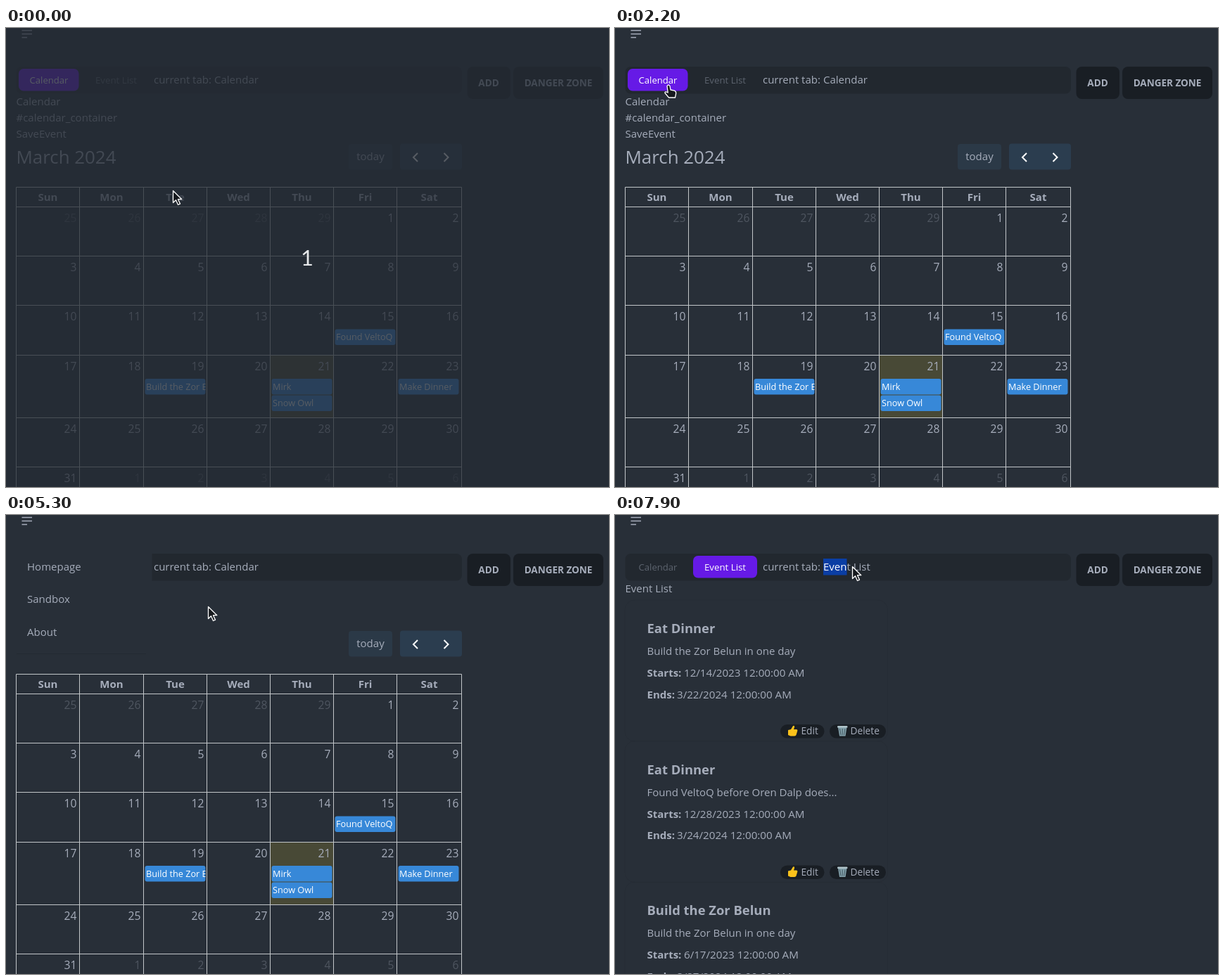
Write an HTML page that moves like this. It is 857 px wide and 653 px high and loops after 8000 ms.

```html
<!DOCTYPE html>
<html lang="en">
<head>
<meta charset="utf-8">
<title>Calendar demo</title>
<style>
html, body { margin: 0; width: 100%; height: 100%; overflow: hidden; background: #282f38; }
svg { display: block; }
text { font-family: "Open Sans", "Noto Sans", sans-serif; font-size: 15px; fill: #a6adbb; white-space: pre; }
.chip { fill: #fff; }
#url { fill: #f2f2f2; }
#digit { font-family: Lato, sans-serif; fill: #e6e8ea; }
</style>
</head>
<body>
<svg id="stage" width="857" height="653" viewBox="0 0 857 653"></svg>
<script>
const LOOP = 8000, STEP = 100;
const BG = '#282f38', DARK = '#191e24', TEXT = '#a6adbb', MUTED = '#5d646f';
const HOST = '192.0.2.7:9090';

const rect = (x, y, w, h, fill, rx = 0, more = '') =>
  `<rect x="${x}" y="${y}" width="${w}" height="${h}" rx="${rx}" fill="${fill}" ${more}/>`;
const text = (x, y, s, more = '') => `<text x="${x}" y="${y}" ${more}>${s}</text>`;
const font = (size, weight = 400, anchor = 'start') =>
  `style="font-size:${size}px;font-weight:${weight};text-anchor:${anchor}"`;
const group = (id, body) => `<g id="${id}">${body}</g>`;

const colX = i => i === 7 ? 647.5 : Math.round(14.2 + 90.2 * i) + .5;
const rowY = [254.5, 324.5, 394.5, 465.5, 554.5, 624.5];

function eventChip(col, y, label) {
  const x = colX(col) + 2, w = 86;
  return rect(x, y, w, 22.5, '#3788d8', 3) +
    `<svg x="${x}" y="${y}" width="${w}" height="23" overflow="hidden">` +
    text(1.5, 15.5, label, font(12.7) + ' class="chip"') + '</svg>';
}

function calendar() {
  let s = text(14.5, 110, 'Calendar') + text(14.5, 133, '#calendar_container') +
    text(14.5, 156, 'SaveEvent') + text(14.5, 192.5, 'March 2024', font(25.9)) +
    rect(487, 165, 62, 36.5, '#2b3947', 4) + text(518, 188, 'today', font(15, 400, 'middle')) +
    rect(560, 164.5, 88, 37, '#2b3d4f', 4) +
    '<path d="M585 178l-6 6 6 6M622.5 178l6 6-6 6" fill="none" stroke="#fff" stroke-width="2"/>' +
    rect(376, 466, 90, 88, '#484936');
  let lines = 'M14.5 226.5H647.5';
  for (const y of rowY) lines += `M14.5 ${y}H647.5`;
  for (let i = 0; i < 8; i++) lines += `M${colX(i)} 226.5V653`;
  s += `<path d="${lines}" fill="none" stroke="#c2c6c9"/>`;
  ['Sun', 'Mon', 'Tue', 'Wed', 'Thu', 'Fri', 'Sat'].forEach((d, i) => {
    s += text((colX(i) + colX(i + 1)) / 2, 245.5, d, font(15, 700, 'middle'));
  });
  for (let n = 0; n < 42; n++) {
    const day = n - 4, col = n % 7, other = day < 1 || day > 31;
    const label = day < 1 ? day + 29 : day > 31 ? day - 31 : day;
    s += text(colX(col + 1) - 4, rowY[n / 7 | 0] + 21, label,
      font(15.7, 400, 'end') + (other ? ' opacity=".3"' : ''));
  }
  return s + eventChip(5, 428.5, 'Found VeltoQ') + eventChip(2, 499, 'Build the Zor Belun') +
    eventChip(4, 499, 'Mirk') + eventChip(4, 522.5, 'Snow Owl') + eventChip(6, 499, 'Make Dinner');
}

function card(y, title, body, start, end) {
  const row = (dy, key, val, dx) =>
    text(45.5, dy, key, font(15, 700)) + text(45.5 + dx, dy, val + ' 12:00:00 AM', font(15.15));
  return `<g transform="translate(0 ${y})">` +
    rect(14, -40, 373.5, 201, 'none', 14, 'stroke="#000" stroke-opacity=".05"') +
    text(45.5, 7, title, font(18.4, 700)) + text(45.5, 38, body) +
    row(69, 'Starts:', start, 52.5) + row(99.5, 'Ends:', end, 42.5) +
    rect(235, 137, 62.5, 19.5, DARK, 9.7) + rect(305, 137, 80, 19.5, DARK, 9.7) +
    '<path d="M246 145l4-1 3-5q2.5-1 2 2l-1 3h4q2 .5 1 3l-1.5 5q-1 1.5-3 1.5h-5l-3.5-1.5z" fill="#fcc21b"/>' +
    '<path d="M317 141h12.5l-2 12.5h-8.5z" fill="#82a0aa"/>' +
    '<path d="M319.5 143l1.5 9M323.2 143v9M327 143l-1.5 9" stroke="#42565f"/>' +
    rect(316, 139, 14.5, 2.6, '#b0c4ca', 1.2) +
    text(264.5, 151, 'Edit', font(13.7)) + text(334.5, 151, 'Delete', font(13.7)) + '</g>';
}

const eventList = () => text(14.5, 110, 'Event List') +
  card(161, 'Eat Dinner', 'Build the Zor Belun in one day', '12/14/2023', '3/22/2024') +
  card(361.5, 'Eat Dinner', 'Found VeltoQ before Oren Dalp does...', '12/28/2023', '3/24/2024') +
  card(562, 'Build the Zor Belun', 'Build the Zor Belun in one day', '6/17/2023', '3/27/2024');

const menu = () => rect(7, 43, 200.5, 155, BG) +
  '<path d="M15 197.5H199" stroke="#232a32"/>' +
  rect(14.5, 0, 185, 46.5, '#363d46', 8, 'id="hover"') +
  ['Homepage', 'Sandbox', 'About'].map((s, i) => text(30, 79 + i * 46.3, s)).join('');

const outline = 'stroke="#fff" stroke-width="1.3" stroke-linejoin="round" fill="#16191d"';
const pointers = {
  arrow: `<path d="M.5.5V17.5l4-3.7 3 6.7 3-1.4-3-6.4h5.3z" ${outline}/>`,
  hand: `<path d="M-2 1.5Q0-1.5 2 1.5L3 7l5.5 1.2q2.5.8 2.2 4l-1.2 5.8H.5L-5 11.5q-.3-2.5 2.6-1.3L-.8 11z" ${outline}/>`,
  beam: '<path d="M-3-9q2 0 3 1 1-1 3-1M0-8V8M-3 9q2 0 3-1 1 1 3 1" fill="none" stroke="#fff" stroke-width="1.4"/>'
};

document.getElementById('stage').innerHTML =
  rect(0, 0, 857, 653, BG) +
  '<circle id="round" cx="29.5" cy="8" r="22.8" fill="#3c434c"/>' +
  `<path d="M22.5 3.5H37M22.5 8.5H37M22.5 13.5H30" stroke="${TEXT}" stroke-width="1.6"/>` +
  rect(14.5, 55, 633.5, 38.5, '#22282f', 8) + rect(0, 58, 0, 31.5, '#661ae6', 7, 'id="pill"') +
  text(61, 78.8, 'Calendar', font(13.1, 400, 'middle') + ' id="tabA"') +
  text(156.5, 78.8, 'Event List', font(13.3, 400, 'middle') + ' id="tabB"') +
  rect(296, 62, 0, 23.5, '#0a3ea4', 0, 'id="mark"') +
  text(210, 79, 'current tab:') + text(296, 79, '', 'id="current"') +
  rect(655.5, 55, 61.5, 46, DARK, 8) + text(686, 82.7, 'ADD', font(13.5, 700, 'middle')) +
  rect(721, 55, 128, 46, DARK, 8) + text(785, 82.7, 'DANGER ZONE', font(13.5, 700, 'middle')) +
  group('calendar', calendar()) + group('list', eventList()) + group('menu', menu()) +
  group('status', '<path id="bar" fill="#1c1f23"/>' + text(5, 648, '', font(15.6) + ' id="url"')) +
  group('count', rect(0, 0, 857, 653, '#252c34', 0, 'opacity=".77"') +
    text(428, 338, '1', font(31, 400, 'middle') + ' id="digit"')) +
  group('cursor', Object.entries(pointers).map(([k, p]) => group(k, p)).join(''));

const $ = id => document.getElementById(id);
const show = (id, on) => { $(id).style.display = on ? '' : 'none'; };
const set = (id, attrs) => { for (const k in attrs) $(id).setAttribute(k, attrs[k]); };
const within = (t, a, b) => t >= a && t < b;

// time, x, y, pointer
const path = [
  [0, 237, 231, 'arrow'], [100, 237.5, 232.5, 'beam'], [200, 237.5, 232.5, 'beam'],
  [300, 238.5, 233, 'beam'], [400, 238.5, 233, 'beam'],
  [500, 230, 222, 'arrow'], [900, 137, 118, 'arrow'], [1100, 140, 86, 'arrow'],
  [1200, 148, 72, 'hand'], [1300, 152, 67, 'hand'], [1500, 152, 67, 'hand'],
  [2000, 76, 81, 'hand'], [2500, 76, 81, 'hand'], [3000, 29, 9, 'hand'],
  [3300, 29, 9, 'hand'], [3600, 40, 171, 'hand'], [3800, 40, 171, 'hand'],
  [4100, 40, 126, 'hand'], [4200, 40, 126, 'hand'], [4300, 43, 113, 'hand'],
  [4400, 43, 113, 'hand'], [4500, 62, 89, 'hand'], [4700, 66, 62, 'hand'],
  [4800, 84, 20, 'arrow'], [5300, 287, 130, 'arrow'], [5400, 284, 128, 'arrow'],
  [5800, 70, 74, 'hand'], [5900, 52, 68, 'hand'], [6000, 52, 68, 'hand'],
  [6100, 49, 65, 'hand'], [6300, 105, 84, 'hand'], [6500, 165, 75, 'hand'],
  [6800, 165, 75, 'hand'], [7000, 196, 67, 'hand'], [7100, 196, 67, 'hand'],
  [7200, 214, 76, 'arrow'], [7500, 297, 79, 'beam'], [7600, 304, 78, 'arrow'],
  [7900, 337, 73, 'arrow'], [8000, 337, 73, 'arrow']
];

function pointerAt(t) {
  let i = 0;
  while (i < path.length - 2 && path[i + 1][0] <= t) i++;
  const [t0, x0, y0, kind] = path[i], [t1, x1, y1] = path[i + 1];
  const k = (t - t0) / (t1 - t0);
  return [x0 + (x1 - x0) * k, y0 + (y1 - y0) * k, kind];
}

function setStatus(t) {
  const [page, w] = t < 4300 ? ['/about', 168] : t < 4500 ? ['/sandbox', 186] : ['', 118];
  show('status', within(t, 3800, 4900));
  $('url').textContent = HOST + page;
  set('bar', { d: `M0 630H${w - 5}q5 0 5 5V653H0z` });
}

function setTabs(t, x, y) {
  const list = within(t, 1600, 2200) || t >= 6700;
  const over = y > 56 && y < 90;
  show('calendar', !list);
  show('list', list);
  set('pill', list ? { x: 111, width: 91 } : { x: 18, width: 85.5 });
  $('tabA').style.fill = !list ? '#fff' : over && x < 104 ? TEXT : MUTED;
  $('tabB').style.fill = list ? '#fff' : over && within(x, 111, 202) ? TEXT : MUTED;
  const name = list ? 'Event List' : 'Calendar';
  const picked = t < 7600 ? 0 : Math.min(4, Math.floor((t - 7500) / STEP));
  $('current').innerHTML =
    `<tspan style="fill:#fff">${name.slice(0, picked)}</tspan>${name.slice(picked)}`;
  set('mark', { width: picked ? $('current').getSubStringLength(0, picked) : 0 });
}

function draw(ms) {
  const t = Math.floor(ms % LOOP / STEP) * STEP;
  const [x, y, kind] = pointerAt(t);
  setTabs(t, x, y);
  setStatus(t);
  show('count', t < 100);
  show('round', within(t, 2900, 3700));
  show('menu', within(t, 3300, 5400));
  show('hover', within(t, 3700, 4800));
  set('hover', { y: t < 4000 ? 143.5 : t < 4600 ? 97 : 50.5 });
  set('cursor', { transform: `translate(${x} ${y})` });
  for (const k in pointers) show(k, k === kind);
}

let begin;
function tick(now) {
  begin ??= now;
  draw(now - begin);
  requestAnimationFrame(tick);
}
draw(0);
requestAnimationFrame(tick);
</script>
</body>
</html>
```
